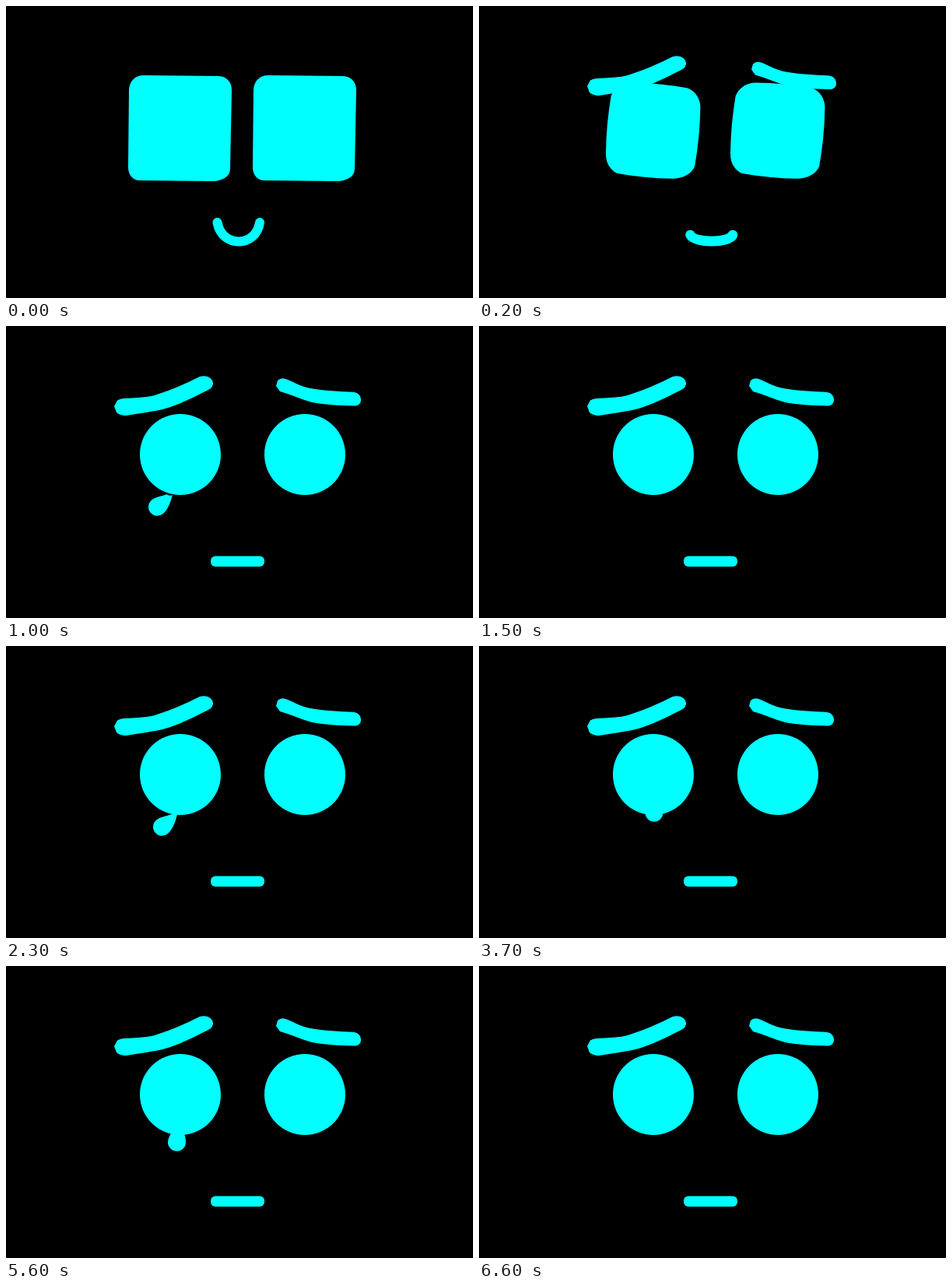
An HTML page with a canvas that plays this animation: 600x375 px, repeating every 7900 ms.

```html
<!DOCTYPE html>
<html lang="en">
<head>
<meta charset="utf-8">
<title>Crying face</title>
<style>
  html, body { margin: 0; width: 100%; height: 100%; overflow: hidden; background: #000; }
  canvas { display: block; }
</style>
</head>
<body>
<canvas id="stage" width="600" height="375"></canvas>
<script>
const ctx = document.getElementById('stage').getContext('2d');
const LOOP = 7900, STEP = 100, CYAN = '#00ffff';

const clamp = v => Math.max(0, Math.min(1, v));
const mix = (a, b, p) => a + (b - a) * p;
const mixPoint = (a, b, p) => [mix(a[0], b[0], p), mix(a[1], b[1], p)];

const leftBrow = new Path2D('M139 103L143 95.5Q147 93 151 93C168 92 180 92 191 89C210 83 231 74 249 65C256 62.5 265 65.5 266 73C266 79 262 81 258 83C240 92 222 101 205 106C190 110 171 112 154 115C149 115 144 113 142 111Z');
const rightBrow = new Path2D('M347 77L349 70Q354 65 362 69C373 74 381 78 391 80C408 83 428 84 447 85C453 86 456 90 456 95C456 100 452 103 446 102.5C428 102 409 101 393 98C379 94 366 88 352 84Z');
const tear = new Path2D('M-2 -28C3 -22 11.5 -10 11.5 0A11.5 11.5 0 0 1 -11.5 0C-11.5 -8 -5 -15 -2 -28Z');

// Each side: start, end, then the two handles of the corner that follows.
const sides = [
  [[177, 89], [272, 90], [283, 90], [290, 97]],
  [[290, 108], [288, 209], [288, 218], [280, 224]],
  [[267, 225], [172, 224], [163, 224], [157, 217]],
  [[157, 207], [158, 107], [159, 96], [166, 89]]
];
const squareEye = sides.flatMap(([a, b, c, d]) =>
  [a, mixPoint(a, b, 1 / 3), mixPoint(a, b, 2 / 3), b, c, d]);

const roundEye = Array.from({ length: 8 }, (_, i) => {
  const r = 52, handle = 0.2652 * r;
  const at = (angle, along) => [
    224 + r * Math.cos(angle) - along * Math.sin(angle),
    165 + r * Math.sin(angle) + along * Math.cos(angle)
  ];
  const start = (i - 2) * Math.PI / 4, end = start + Math.PI / 4;
  return [at(start, 0), at(start, handle), at(end, -handle)];
}).flat();

// show: first visible time; begin..end: slide out of the eye; dx: shift of the whole tear.
const tears = [
  { show: 400, begin: 200, end: 700, dx: -6 },
  { show: 2000, begin: 1800, end: 2300, dx: 0 },
  { show: 3700, begin: 3700, end: 4000, dx: 0 },
  { show: 5500, begin: 5500, end: 5800, dx: 0 }
];

function drawEye(dx, p) {
  const pts = squareEye.map((q, i) => mixPoint(q, roundEye[i], p));
  ctx.beginPath();
  ctx.moveTo(pts[0][0] + dx, pts[0][1]);
  for (let i = 0; i < pts.length; i += 3) {
    const [a, b, c] = [1, 2, 3].map(n => pts[(i + n) % pts.length]);
    ctx.bezierCurveTo(a[0] + dx, a[1], b[0] + dx, b[1], c[0] + dx, c[1]);
  }
  ctx.fill();
}

function drawMouth(p) {
  ctx.beginPath();
  if (p === 1) {
    ctx.roundRect(263, 295.5, 69, 13.5, 6);
    ctx.fill();
    return;
  }
  const endY = mix(278, 302, p), midY = mix(310.7, 302, p);
  ctx.lineWidth = mix(12, 13, p);
  ctx.moveTo(271.5, endY);
  ctx.bezierCurveTo(277, midY, 321, midY, 326, endY);
  ctx.stroke();
}

function drawTear(t, { show, begin, end, dx }) {
  const wipe = (t - end - 300) / 100;
  if (t < show || wipe >= 5) return;
  const p = clamp((t - begin) / (end - begin));
  const curve = (a, b, c) => mix(mix(a, b, p), mix(b, c, p), p);
  ctx.save();
  ctx.translate(dx, 0);
  ctx.save();
  ctx.translate(curve(225, 218.75, 200.5), curve(214, 237, 232.3));
  ctx.rotate(50 * p * p * Math.PI / 180);
  ctx.fill(tear);
  ctx.restore();
  if (wipe >= 0) {
    ctx.fillStyle = '#000';
    ctx.beginPath();
    ctx.arc(217 - 1.33 * wipe, 210.7, 7 + 5.5 * wipe, 0, 2 * Math.PI);
    ctx.fill();
  }
  ctx.restore();
}

function draw(t) {
  ctx.fillStyle = '#000';
  ctx.fillRect(0, 0, 600, 375);
  ctx.fillStyle = ctx.strokeStyle = CYAN;
  ctx.lineCap = 'round';

  const p = clamp(t / 500);
  tears.forEach(item => drawTear(t, item));
  drawEye(0, p);
  drawEye(160, p);
  drawMouth(clamp(t / 300));
  if (t >= 200) {
    ctx.fill(leftBrow);
    ctx.save();
    ctx.translate(5 * (1 - p), 7.5 * (1 - p));
    ctx.fill(rightBrow);
    ctx.restore();
  }
}

const startTime = performance.now();
function frame() {
  const t = (performance.now() - startTime) % LOOP;
  draw(Math.floor(t / STEP) * STEP);
  requestAnimationFrame(frame);
}
frame();
</script>
</body>
</html>
```
